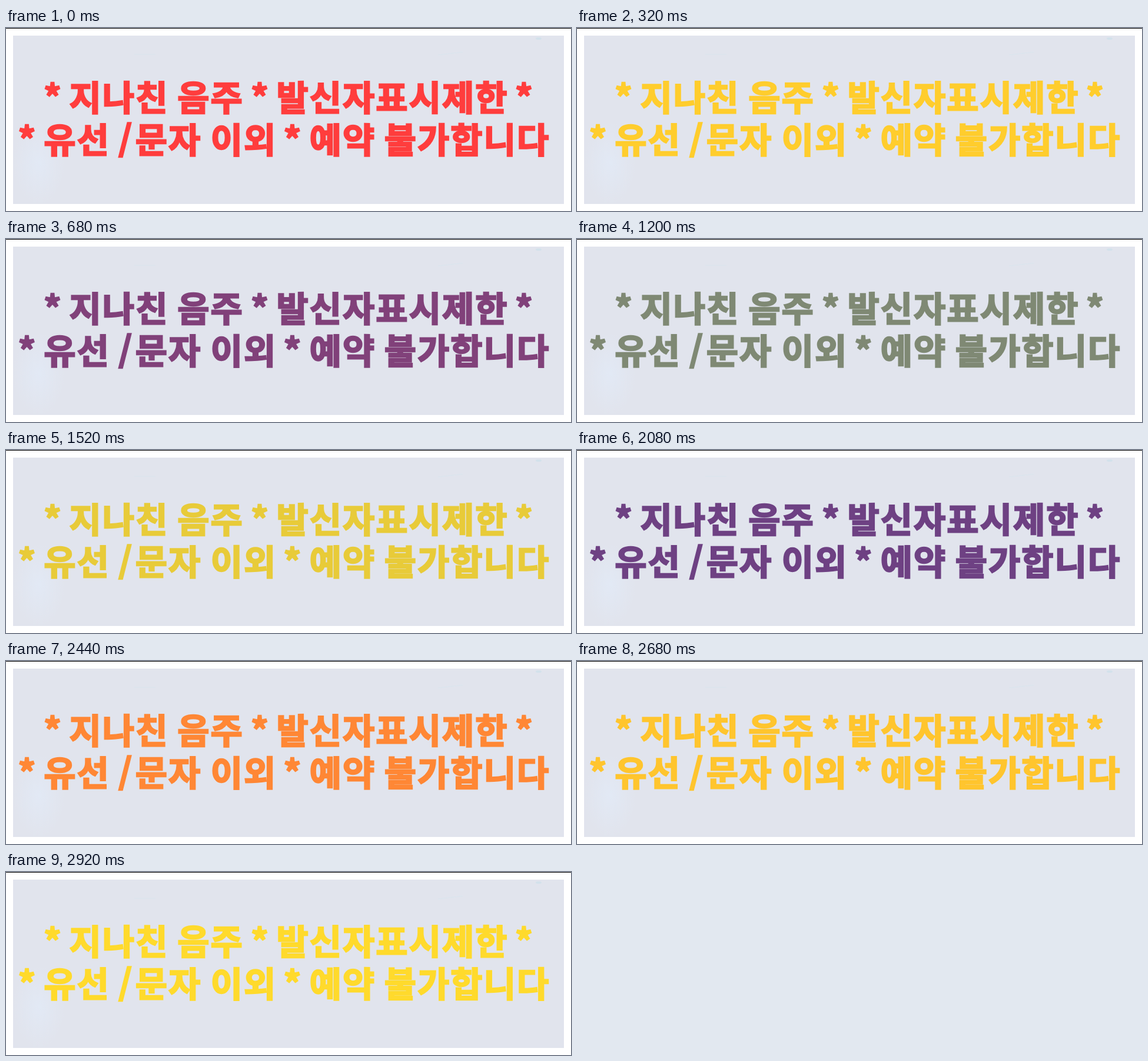
These frames come from a looping animation (960 by 312 pixels, 3 s). An HTML page:

```html
<!DOCTYPE html>
<html lang="ko">
<head>
<meta charset="utf-8">
<style>
html, body { margin: 0; width: 100%; height: 100%; overflow: hidden; background: #fff; }
svg { display: block; width: 960px; height: 312px; }
text {
  font: 900 59px "Noto Sans CJK KR", "Noto Sans CJK", "Noto Sans CJK JP", sans-serif;
  letter-spacing: 2px;
  text-anchor: middle;
}
#words { fill: currentColor; stroke: currentColor; stroke-width: 2.4; stroke-miterlimit: 3; }
</style>
</head>
<body>
<svg viewBox="0 0 960 312">
  <defs>
    <radialGradient id="glow">
      <stop offset="0" stop-color="#e2e9f5"/>
      <stop offset="1" stop-color="#e2e9f5" stop-opacity="0"/>
    </radialGradient>
  </defs>
  <rect width="960" height="1"/>
  <rect x="12" y="13" width="936" height="287" fill="#e1e4ed"/>
  <path d="M12 160H100V300H12Z" fill="url(#glow)"/>
  <path d="M734 46L776 41M218 45H254" stroke="#d9e5ee"/>
  <ellipse cx="905" cy="18" rx="5" ry="2" fill="#d3e1eb"/>
  <g id="words"></g>
</svg>
<script>
const words = document.getElementById("words");

// Each line: baseline, then words with their centres
const lines = [
  [141, ["*", 79], ["지나친", 191], ["음주", 346.5], ["*", 431], ["발신자표시제한", 655.5], ["*", 880]],
  [213, ["*", 35.5], ["유선", 119.5], ["/", 202.5], ["문자", 275], ["이외", 403], ["*", 486.5],
    ["예약", 571], ["불가합니다", 782.5]]
];
for (const [y, ...items] of lines) {
  for (const [word, x] of items) {
    const node = document.createElementNS("http://www.w3.org/2000/svg", "text");
    node.setAttribute("x", x + 1);
    node.setAttribute("y", y);
    node.textContent = word;
    words.append(node);
  }
}

// Colour wheel: yellow, blue, red and back to yellow
const wheel = [[255, 218, 44], [18, 68, 176], [255, 61, 61], [255, 218, 44]];

// Moves along the wheel: start ms, end ms, from, to
const moves = [[0, 450, 2, 3], [462, 885, 3, 1], [1000, 1758, 1, 0], [1772, 2924, 0, 3]];

function colorAt(ms) {
  const [start, end, from, to] = moves.findLast(m => m[0] <= ms);
  const left = 1 - Math.min(1, (ms - start) / (end - start));
  const pos = to + (from - to) * left * left;
  const i = Math.min(2, Math.floor(pos));
  return wheel[i].map((c, k) => Math.round(c + (wheel[i + 1][k] - c) * (pos - i)));
}

function draw(now) {
  const ms = Math.floor(now % 3000 / 40) * 40;
  words.style.color = `rgb(${colorAt(ms)})`;
  requestAnimationFrame(draw);
}
draw(performance.now());
</script>
</body>
</html>
```
